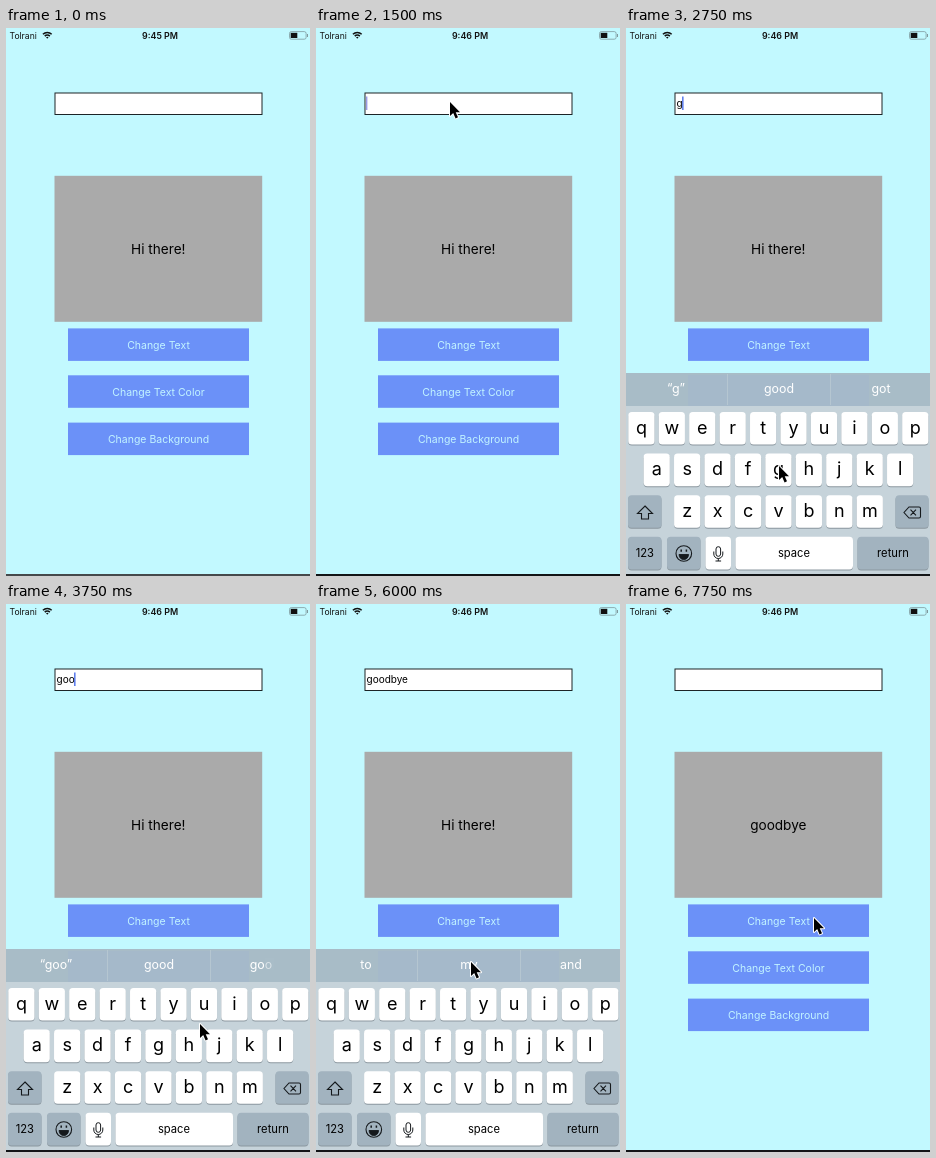
An HTML page with a canvas for the animation above (8 s loop, 304 by 548 pixels).

```html
<!DOCTYPE html>
<html lang="en">
<head>
<meta charset="utf-8">
<title>Change the label</title>
<style>
html, body { margin: 0; width: 100%; height: 100%; overflow: hidden; background: #c2f9ff; }
canvas { display: block; width: 304px; height: 548px; }
</style>
</head>
<body>
<canvas></canvas>
<script>
const W = 304, H = 548, LOOP = 8000, STEP = 250;
const canvas = document.querySelector('canvas');
const c = canvas.getContext('2d');
const dpr = window.devicePixelRatio || 1;
canvas.width = W * dpr;
canvas.height = H * dpr;

// Pointer tip: time, x, y
const pointer = [
  [1000, 148, 112], [1250, 134, 74], [1750, 134, 74], [2500, 153, 438],
  [2750, 153, 438], [3250, 258, 400], [3500, 258, 400], [3750, 194, 420],
  [4000, 124, 442], [4250, 124, 442], [5000, 176, 486], [5250, 162, 375],
  [5500, 155, 358], [6500, 155, 358], [7000, 188, 314], [8000, 188, 314]
];
// Field contents and suggestions, from a given time on
const typing = [
  [0, '', 'I', 'the', 'I\'m'],
  [2750, 'g', '“g”', 'good', 'got'],
  [3250, 'go', '“go”', 'good', 'going'],
  [3500, 'goo', '“goo”', 'good', 'goo'],
  [4250, 'good', '“good”', 'goodbye', 'goodness'],
  [5750, 'goodbye ', 'to', 'my', 'and'],
  [7500, '', 'I', 'the', 'I\'m']
];

function rect(x, y, w, h, fill) {
  c.fillStyle = fill;
  c.fillRect(x, y, w, h);
}

function text(s, x, y, size, fill = '#000', align = 'center', weight = 400) {
  c.font = `${weight} ${size}px Inter, Roboto, sans-serif`;
  c.textAlign = align;
  c.fillStyle = fill;
  c.fillText(s, x, y);
}

function line(d, width = 1.1, fill) {
  const p = new Path2D(d);
  if (fill) { c.fillStyle = fill; c.fill(p); }
  c.strokeStyle = '#15191c';
  c.lineWidth = width;
  c.stroke(p);
}

function key(x, y, w, fill = '#fff') {
  for (const [dy, color] of [[1, '#8b979f'], [0, fill]]) {
    c.fillStyle = color;
    c.beginPath();
    c.roundRect(x, y + dy, w, 32.6, 3.6);
    c.fill();
  }
}

function statusBar(t) {
  text('Tolrani', 3.5, 11, 8.6, '#111', 'left');
  text(t < 500 ? '9:45 PM' : '9:46 PM', 154, 11, 8.9, '#111', 'center', 600);
  c.strokeStyle = '#111';
  c.lineWidth = 1.5;
  for (const r of [1, 3.6, 6.2]) {
    c.beginPath();
    c.arc(41.3, 10.7, r, -Math.PI * .75, -Math.PI * .25);
    c.stroke();
  }
  c.strokeStyle = '#7f9a9e';
  c.lineWidth = .8;
  c.beginPath();
  c.roundRect(283.5, 3.6, 16.6, 7.6, 1.8);
  c.stroke();
  rect(284.7, 4.8, 6.6, 5.2, '#111');
  rect(301, 6, 1, 3, '#7f9a9e');
}

function field(t, value) {
  rect(48.5, 64.5, 208, 22.5, '#1c2426');
  rect(49.5, 65.5, 206, 20.5, '#fff');
  text(value, 50.5, 79, 10, '#000', 'left');
  const focused = t >= 1500 && t < 7500;
  if (focused && t / STEP % 4 !== 0) {
    const x = 50 + c.measureText(value).width;
    rect(x, 68.5, 1.4, 13.5, t < 2000 ? '#9a9be6' : '#4a6eea');
  }
}

function button(label, y, pressed) {
  rect(62, y, 181, 32.5, '#6b91f8');
  text(label, 152.5, y + 20.4, 10.5, pressed ? '#849fef' : '#c2f4ff');
}

function keyboard(words, t) {
  rect(0, 345, W, 203, '#c6d3da');
  rect(0, 345, W, 33, '#a8bcc7');
  rect(62, 347, 181, 31, '#a5b9ca');
  rect(101, 346, .8, 31, '#b9cad2');
  rect(204, 346, .8, 31, '#b9cad2');
  words.forEach((word, i) => {
    const x = [50, 153, 255][i];
    text(word, x, 364.8, 12.4, '#fff');
    if (word === 'goo' && t >= 3500) {
      c.globalAlpha = .45;
      rect(x + 4, 354, 9, 12, '#a8bcc7');
      c.globalAlpha = 1;
    }
  });
  ['qwertyuiop', 'asdfghjkl', 'zxcvbnm'].forEach((row, r) => {
    const y = 384 + r * 41.6, left = [15.4, 30.7, 61.2][r];
    [...row].forEach((ch, i) => {
      const x = left + i * 30.43;
      key(x - 13.1, y, 26.2);
      text(ch, x, y + 21.5, 18);
    });
  });
  const gray = '#a2b3bf';
  key(2, 467.2, 33.5, gray);
  key(269.5, 467.2, 33, gray);
  key(2, 508.8, 33.5, gray);
  key(41, 508.8, 33.5, gray);
  key(79.5, 508.8, 25.5);
  key(109.5, 508.8, 117.5);
  key(231.5, 508.8, 71, gray);
  text('123', 18.8, 529.2, 11.2);
  text('space', 168, 528.8, 11.2);
  text('return', 267, 528.8, 11.2);
  // shift, delete, smiley, microphone
  line('M19 478 L26.5 485.5 H22.5 V491 H15.5 V485.5 H11.5Z');
  line('M283 479 H293 Q294.5 479 294.5 480.5 V488.5 Q294.5 490 293 490 H283 L278 484.5Z M284.5 481.7 L290 487.3 M290 481.7 L284.5 487.3');
  line('M50 525.5 a7.8 7.8 0 1 0 15.6 0 a7.8 7.8 0 1 0 -15.6 0');
  line('M53 526.5 H62.6 Q62 531.5 57.8 531.5 T53 526.5Z', .9, '#15191c');
  line('M55.2 521.4 V523.8 M60.4 521.4 V523.8', 1.5);
  line('M90 521 a2.3 2.3 0 0 1 4.6 0 V526 a2.3 2.3 0 0 1 -4.6 0Z M87.8 523.5 V526 a4.5 4.5 0 0 0 9 0 V523.5 M92.3 530.5 V533 M89.5 533 H95.1', 1);
}

function drawPointer(t) {
  if (t < pointer[0][0]) return;
  const i = pointer.findIndex(p => p[0] > t);
  const [t0, x0, y0] = pointer[i - 1], [t1, x1, y1] = pointer[i];
  const k = (t - t0) / (t1 - t0);
  c.save();
  c.translate(x0 + (x1 - x0) * k, y0 + (y1 - y0) * k);
  const arrow = new Path2D('M0 0 V14 L3.2 11 L5.6 16.4 L8 15.3 L5.7 10.2 H10Z');
  c.strokeStyle = '#fff';
  c.lineWidth = 2;
  c.lineJoin = 'round';
  c.stroke(arrow);
  c.fillStyle = '#000';
  c.fill(arrow);
  c.restore();
}

function draw(t) {
  const [, value, ...words] = typing.findLast(s => s[0] <= t);
  c.setTransform(dpr, 0, 0, dpr, 0, 0);
  rect(0, 0, W, H, '#c2f9ff');
  statusBar(t);
  field(t, value);
  rect(48.5, 147.8, 207.7, 146, '#aaa');
  text(t < 7500 ? 'Hi there!' : 'goodbye', 152.3, 226, 13.6);
  button('Change Text', 300.4, t === 7250);
  button('Change Text Color', 347.3);
  button('Change Background', 394.6);
  if (t >= 1750 && t < 7750) {
    c.save();
    if (t >= 7500) c.translate(0, 110);
    keyboard(words, t);
    c.restore();
  }
  rect(0, 546, W, 2, t < 500 ? '#45494b' : '#121416');
  drawPointer(t);
}

const start = performance.now();
function tick() {
  const t = (performance.now() - start) % LOOP;
  draw(Math.floor(t / STEP) * STEP);
  requestAnimationFrame(tick);
}
tick();
</script>
</body>
</html>
```
